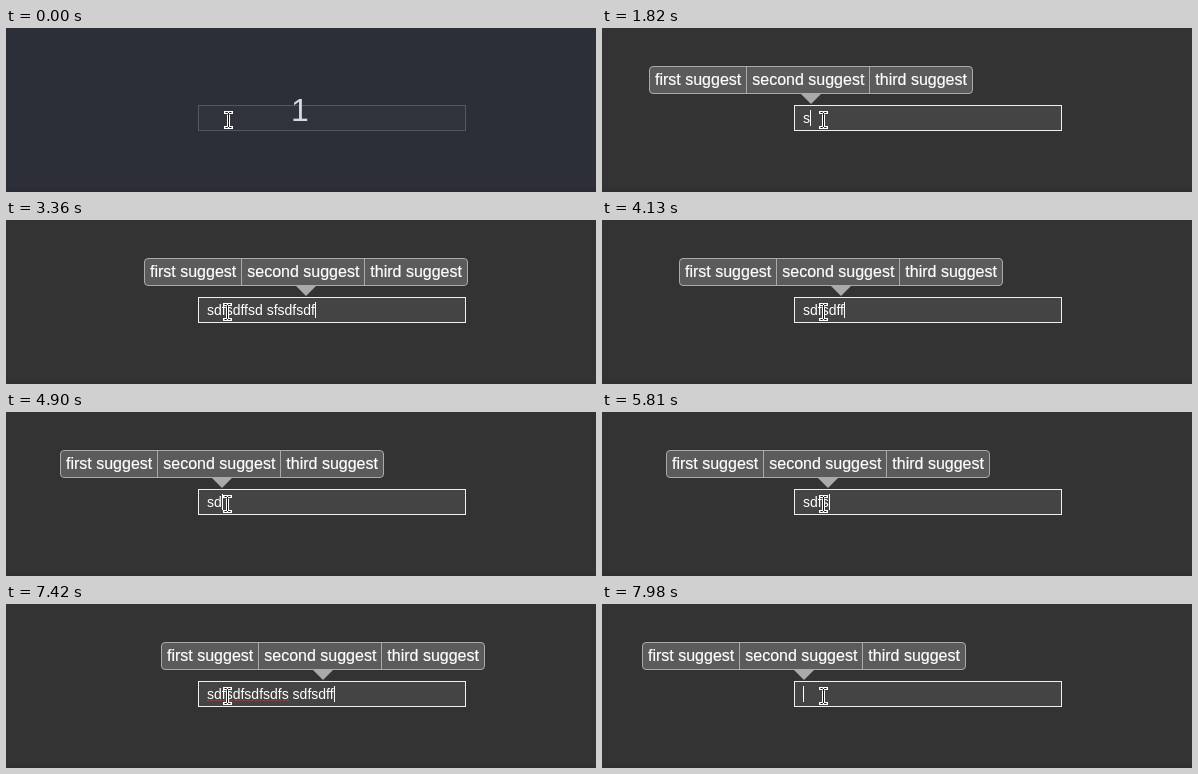
Animation, 590 px wide and 164 px high, one loop 8 s. Source, as an HTML page:

```html
<!DOCTYPE html>
<html lang="en">
<head>
<meta charset="utf-8">
<title>Input suggestions</title>
<style>
  html, body { margin: 0; width: 100%; height: 100%; overflow: hidden; background: #333; }
  #stage {
    position: relative; width: 590px; height: 164px; overflow: hidden;
    background: linear-gradient(#333 160px, #303030 160px);
    font-family: "Liberation Sans", Arial, sans-serif; color: #fff;
  }
  #stage > *, #field > * { position: absolute; }
  #field {
    left: 192px; top: 77px; width: 266px; height: 24px;
    border: 1px solid #eee; background: #444;
  }
  #text { left: 8px; top: 0; font-size: 14px; line-height: 24px; white-space: pre; }
  #caret { top: 4px; width: 1px; height: 16px; background: #fff; }
  #typo {
    left: 8px; top: 18px; height: 1px;
    background: repeating-linear-gradient(90deg, #c03030 0 2px, #803535 2px 4px);
  }
  #popup {
    top: 38px; left: 40px; display: flex; box-sizing: border-box; height: 28px;
    border: 1px solid #aaa; border-radius: 4px; background: #5b5b5b;
    font-size: 16px; line-height: 26px; white-space: nowrap;
    -webkit-text-stroke: 0.2px #fff;
  }
  #popup span { padding: 0 5px; }
  #popup span + span { border-left: 1px solid #aaa; }
  #popup::after {
    content: ""; position: absolute; left: 50%; top: 100%; margin-left: -11px;
    border: 11px solid transparent; border-top-color: #aaa; border-bottom: 0;
  }
  #count {
    left: 264px; top: 62px; width: 60px; text-align: center;
    font-size: 32px; line-height: 40px; color: #d3dae3;
  }
  #stage.counting { background: linear-gradient(#2c2f37 160px, #2a2b34 160px); }
  .counting #field { background: #30333b; border-color: #55575e; }
  #mouse { left: 0; top: 0; }
  [hidden] { display: none !important; }
</style>
</head>
<body>
<div id="stage">
  <div id="popup"><span>first suggest</span><span>second suggest</span><span>third suggest</span></div>
  <div id="field">
    <div id="typo"></div>
    <div id="text"></div>
    <div id="caret"></div>
  </div>
  <div id="count">1</div>
  <svg id="mouse" width="590" height="164" fill="none">
    <defs>
      <path id="beam" d="M219.5 84.500h2l1 1l1-1h2M222.500 85v14M219.500 99.500h2l1-1l1 1h2"/>
    </defs>
    <g id="pointer">
      <use href="#beam" stroke="#fff" stroke-width="3" stroke-linecap="square"/>
      <use href="#beam" stroke="#111"/>
    </g>
  </svg>
</div>
<script>
const LOOP = 8000, STEP = 70, COUNT_END = 630, FOCUS = 770, SPELLCHECK = 6790;
const FIRST = "sdfsdffsd sfsdfsdf", SECOND = "sdfsdfsdfsdfs sdfsdff";

// Runs of typing or deleting: the length moves evenly, then holds
const runs = [
  { phrase: FIRST, start: 1820, end: 2380, from: 1, to: 9 },
  { phrase: FIRST, start: 2660, end: 3360, from: 10, to: 18 },
  { phrase: FIRST, start: 3640, end: 5250, from: 10, to: 0 },
  { phrase: SECOND, start: 5600, end: 6580, from: 1, to: 13 },
  { phrase: SECOND, start: SPELLCHECK, end: 7210, from: 14, to: 21 },
  { phrase: SECOND, start: 7700, end: 7980, from: 21, to: 0 }
];

const $ = id => document.getElementById(id);
const stage = $("stage"), popup = $("popup"), text = $("text"), caret = $("caret");
const typo = $("typo"), count = $("count"), pointer = $("pointer");
const pen = document.createElement("canvas").getContext("2d");
pen.font = '14px "Liberation Sans", Arial, sans-serif';
const widthOf = s => pen.measureText(s).width;

// The popup follows whole-pixel letter widths
const popupShift = s => [...s].reduce((x, c) => x + Math.floor(widthOf(c)), 0);

function typedAt(t) {
  const run = runs.filter(r => t >= r.start).pop();
  if (!run) return "";
  const tickTime = Math.floor(t / STEP) * STEP;
  const p = Math.min(1, (tickTime - run.start) / (run.end - run.start));
  return run.phrase.slice(0, Math.round(run.from + (run.to - run.from) * p));
}

function draw(t) {
  const typed = typedAt(t), focused = t >= FOCUS;
  stage.classList.toggle("counting", t < COUNT_END);
  count.hidden = t >= COUNT_END;
  pointer.setAttribute("transform", `translate(${t < STEP ? 0 : -1} 0)`);

  popup.hidden = !focused;
  popup.style.left = 40 + popupShift(typed) + "px";

  text.textContent = typed;
  caret.hidden = !focused || (t >= 1330 && t < runs[0].start);
  caret.style.left = 8 + Math.round(widthOf(typed)) + "px";

  typo.hidden = t < SPELLCHECK || !typed.includes(" ");
  typo.style.width = widthOf(typed.split(" ")[0]) + "px";
}

const start = performance.now();
function tick() {
  draw((performance.now() - start) % LOOP);
  requestAnimationFrame(tick);
}
tick();
</script>
</body>
</html>
```
